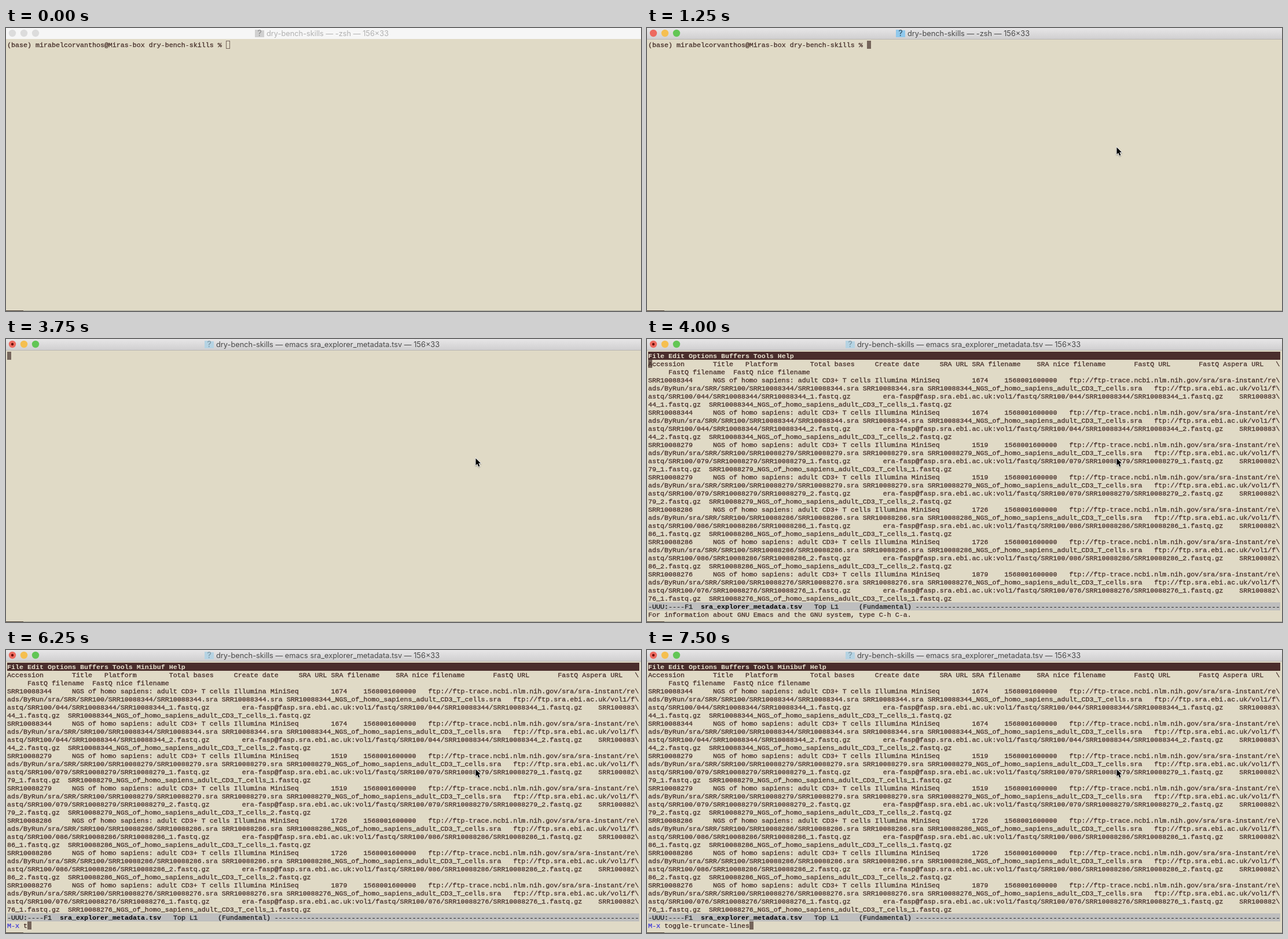
These frames come from a looping animation (1097x490 px, 8 s). An HTML page with a canvas:

```html
<!DOCTYPE html>
<html lang="en">
<head>
<meta charset="utf-8">
<title>Terminal session</title>
<style>
  html, body { margin: 0; width: 100%; height: 100%; overflow: hidden; background: #e0dac6; }
  canvas { display: block; width: 1097px; height: 490px; }
</style>
</head>
<body>
<canvas id="stage" width="1097" height="490"></canvas>
<script>
const ctx = document.getElementById('stage').getContext('2d');
const W = 1097, H = 490, LOOP = 8000;
const COLS = 156, CW = 7, RH = 14, LEFT = 2, TOP = 22;
const PAPER = '#e0dac6', INK = '#452e29', BROWN = '#4a2d2c', CARET = '#75655b';
const MONO = '11.665px "Liberation Mono", "DejaVu Sans Mono", monospace';
const SANS = '12.8px Inter, Roboto, "Liberation Sans", sans-serif';

const FILE = 'sra_explorer_metadata.tsv';
const PROMPT = '(base) mirabelcorvanthos@Miras-box dry-bench-skills % ';
const COMMAND = 'emacs ' + FILE;

// Pointer tip: [start, x, y]
const POINTER = [[500, 875, 202], [750, 813, 214], [1000, 811, 206]];
// Minibuffer input: [start, letters typed]
const MINIBUF = 'toggle-truncate-lines';
const KEYS = [[5750, 0], [6250, 1], [6500, 3], [6750, 7], [7000, 8], [7250, 10], [7500, 21]];

const latest = (list, t) => list.filter(e => e[0] <= t).pop();

function expandTabs(fields) {
  return fields.reduce((line, f) => line + ' '.repeat(8 - line.length % 8) + f);
}

// Long lines continue on the next row after a backslash.
function wrap(line) {
  const rows = [];
  for (; line.length > COLS; line = line.slice(COLS - 1)) rows.push(line.slice(0, COLS - 1) + '\\');
  return [...rows, line];
}

function record(id, bases, read) {
  const run = 'SRR10088' + id;
  const nice = run + '_NGS_of_homo_sapiens_adult_CD3_T_cells';
  const fastq = `${run}_${read}.fastq.gz`;
  const path = `vol1/fastq/SRR100/0${String(id).slice(1)}/${run}/${fastq}`;
  return [
    run, 'NGS of homo sapiens: adult CD3+ T cells', 'Illumina MiniSeq', String(bases), '1568001600000',
    `ftp://ftp-trace.ncbi.nlm.nih.gov/sra/sra-instant/reads/ByRun/sra/SRR/SRR100/${run}/${run}.sra`,
    run + '.sra', nice + '.sra', 'ftp://ftp.sra.ebi.ac.uk/' + path,
    'era-fasp@fasp.sra.ebi.ac.uk:' + path, fastq, `${nice}_${read}.fastq.gz`
  ];
}

const HEADER = ['Accession', 'Title', 'Platform', 'Total bases', 'Create date', 'SRA URL', 'SRA filename',
  'SRA nice filename', 'FastQ URL', 'FastQ Aspera URL', 'FastQ filename', 'FastQ nice filename'];
const RUNS = [[344, 1674], [279, 1519], [286, 1726], [276, 1879]];
const BUFFER = [HEADER, ...RUNS.flatMap(([id, n]) => [record(id, n, 1), record(id, n, 2)])]
  .flatMap(f => wrap(expandTabs(f))).slice(0, 30);

function box(x, y, w, h, color) {
  ctx.fillStyle = color;
  ctx.fillRect(x, y, w, h);
}

function disc(x, y, r, color) {
  ctx.fillStyle = color;
  ctx.beginPath();
  ctx.arc(x, y, r, 0, Math.PI * 2);
  ctx.fill();
}

// Regular text gets a hairline to match the heavier screen smoothing.
function write(text, col, row, color = INK, weight = '') {
  const x = LEFT + col * CW, y = TOP + row * RH + 11;
  ctx.font = `${weight} ${MONO}`;
  ctx.fillStyle = ctx.strokeStyle = color;
  ctx.fillText(text, x, y);
  if (weight) return;
  ctx.lineWidth = 0.3;
  ctx.strokeText(text, x, y);
}

function caret(col, row) {
  box(LEFT + col * CW, TOP + row * RH, CW, RH, CARET);
}

function icon(x, fill, ink) {
  box(x, 3, 6, 3, fill);
  box(x, 4, 16, 12, fill);
  ctx.font = '14px Inter, "Liberation Sans", sans-serif';
  ctx.fillStyle = ink;
  ctx.textAlign = 'center';
  ctx.fillText('?', x + 8, 14);
  ctx.textAlign = 'left';
}

function titleBar(active, editing) {
  if (active) {
    const g = ctx.createLinearGradient(0, 0, 0, 19);
    g.addColorStop(0, '#e7e6e7');
    g.addColorStop(1, '#d0cfd0');
    box(0, 0, W, 19, g);
    box(0, 19, W, 1, '#b9b7b3');
  } else {
    box(0, 0, W, 19, '#f6f6f6');
  }
  const lights = active ? ['#ed6a5f', '#f5bf50', '#62c655'] : ['#dcdcdc', '#dcdcdc', '#dcdcdc'];
  lights.forEach((c, i) => disc(11 + 20 * i, 9, 6.2, c));
  if (editing) disc(11, 9, 2.2, '#6b0d0a');

  const x = editing ? 343 : 430;
  if (!active) icon(x, '#d0d0d0', '#8c8c8c');
  else if (editing) icon(x, '#b5d3e3', '#7792a1');
  else icon(x, '#8fc8ec', '#2d4a5c');
  ctx.font = SANS;
  ctx.fillStyle = active ? '#484848' : '#b0b0b0';
  ctx.fillText(`dry-bench-skills — ${editing ? COMMAND : '-zsh'} — 156×33`, x + 20, 14);
}

function shell(t) {
  const line = PROMPT + (t >= 2250 ? COMMAND : '');
  write(line, 0, 0);
  if (t >= 1250) return caret(line.length, 0);
  ctx.strokeStyle = CARET;
  ctx.lineWidth = 1;
  ctx.strokeRect(LEFT + line.length * CW + 0.5, TOP + 0.5, CW - 1, RH - 1);
}

function editor(t) {
  const key = latest(KEYS, t);
  const width = COLS * CW;
  box(LEFT, TOP, width, RH, BROWN);
  write(`File Edit Options Buffers Tools ${key ? 'Minibuf ' : ''}Help`, 0, 0, '#e9e2d0', 'bold');

  if (!key) caret(0, 1);
  BUFFER.forEach((line, i) => write(line, 0, i + 1));

  box(LEFT, TOP + 31 * RH, width, RH, '#bebebe');
  write('-UUU:----F1', 0, 31, '#1c1c1c');
  write(FILE, 13, 31, '#000', 'bold');
  write('Top L1     (Fundamental) ' + '-'.repeat(90), 41, 31, '#1c1c1c');

  if (key) {
    write('M-x', 0, 32, '#3a35d8');
    write(MINIBUF.slice(0, key[1]), 4, 32);
    caret(4 + key[1], 32);
  } else if (t < 5250) {
    write('For information about GNU Emacs and the GNU system, type C-h C-a.', 0, 32);
  }
}

function pointer(x, y) {
  const arrow = new Path2D('M0 0V13.5L3.1 10.7L5.4 16L7.7 15L5.4 9.8H9.6Z');
  ctx.save();
  ctx.translate(x + 0.5, y + 0.5);
  ctx.scale(0.9, 0.9);
  ctx.lineJoin = 'round';
  ctx.lineWidth = 2;
  ctx.strokeStyle = '#fff';
  ctx.shadowColor = 'rgba(0,0,0,.35)';
  ctx.shadowBlur = 2;
  ctx.shadowOffsetY = 1;
  ctx.stroke(arrow);
  ctx.shadowColor = 'transparent';
  ctx.fillStyle = '#000';
  ctx.fill(arrow);
  ctx.restore();
}

function draw(t) {
  box(0, 0, W, H, PAPER);
  titleBar(t >= 1250, t >= 3750);
  if (t < 3750) shell(t);
  else if (t < 4000) caret(0, 0);
  else editor(t);
  box(0, 489, W, 1, '#a3a396');
  box(0, 489, 30, 1, '#44392f');
  const p = latest(POINTER, t);
  if (p) pointer(p[1], p[2]);
}

let start;
function tick(now) {
  start ??= now;
  draw((now - start) % LOOP);
  requestAnimationFrame(tick);
}
draw(0);
requestAnimationFrame(tick);
</script>
</body>
</html>
```
